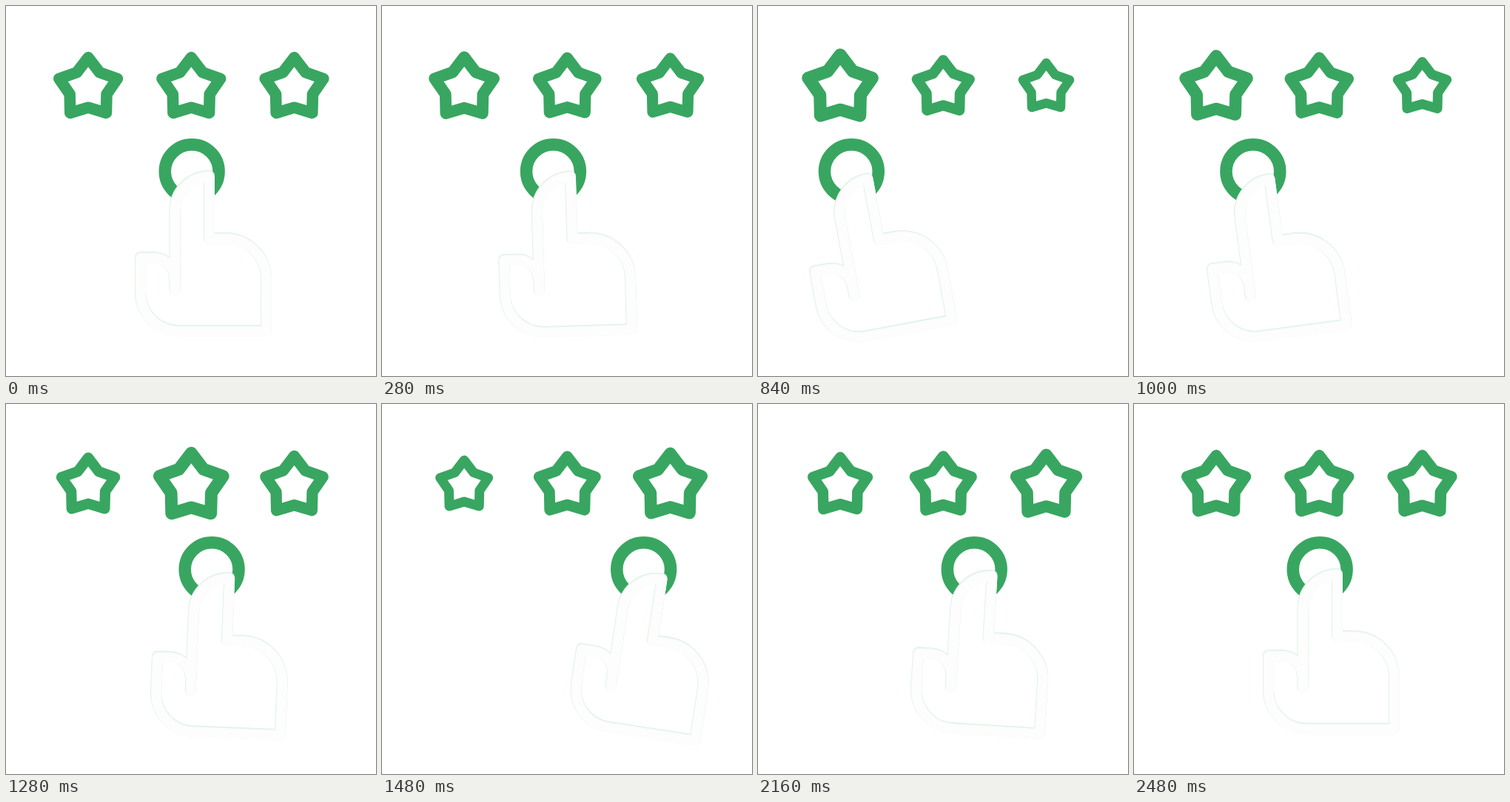
Animation, 500 px wide and 500 px high, one loop 3 s. Source, as an HTML page:

```html
<!DOCTYPE html>
<html lang="en">
<head>
<meta charset="utf-8">
<title>Rating stars</title>
<style>
  html, body { margin: 0; width: 100%; height: 100%; overflow: hidden; background: #fff; }
  svg { display: block; width: 100%; height: 100%; }
  .green { fill: none; stroke: #38a660; stroke-linejoin: round; }
  #stars { stroke-width: 15.5; }
  #ring { stroke-width: 16.5; }
  #hand { fill: none; stroke-linecap: round; stroke-linejoin: round; }
  #hand :first-child { fill: #fff; }
</style>
</head>
<body>
<svg viewBox="0 0 500 500">
  <defs>
    <path id="outline" d="M228 383v-107a46.5 46.5 0 0 1 46.5-46.5v84h22a55 55 0 0 1 55 55v70h-118a52 52 0 0 1-52-52v-47h18a28 28 0 0 1 28 28"/>
  </defs>
  <g id="stars" class="green"></g>
  <circle id="ring" class="green" cx="251.2" cy="223.6" r="36.4"/>
  <g id="hand"></g>
</svg>
<script>
const LOOP = 3000, STEP = 40;
const RING_REACH = 126.5, HAND_REACH = 127.7, TILT = 10.7, DROP = 5;
const PIVOT = "265.5 232";
const CENTER = 250.3, SPACING = 139.2, STAR_Y = 107;
const SHADES = 4;

const ring = document.getElementById("ring");
const hand = document.getElementById("hand");

function add(parent, name, attributes) {
  const node = document.createElementNS("http://www.w3.org/2000/svg", name);
  for (const key in attributes) node.setAttribute(key, attributes[key]);
  return parent.appendChild(node);
}

function starPoints() {
  return Array.from({ length: 10 }, (_, i) => {
    const radius = i % 2 ? 26.2 : 41.4, angle = i * Math.PI / 5;
    return [radius * Math.sin(angle), 4 - radius * Math.cos(angle)];
  }).join(" ");
}

const stars = [0, 1, 2].map(() =>
  add(document.getElementById("stars"), "polygon", { points: starPoints() }));

// Paler, thinner strokes slide downwards, leaving a green shade on upper edges.
for (let i = 0; i < SHADES; i++) {
  const k = i / (SHADES - 1);
  add(hand, "use", {
    href: "#outline",
    stroke: `hsl(140 ${45 - 25 * k}% ${89 + 10 * Math.sqrt(k)}%)`,
    "stroke-width": 15 - 2 * k,
    transform: `translate(${0.5 * k} ${1.4 * k})`
  });
}

function ease(time, from, to) {
  const p = Math.min(1, Math.max(0, (time - from) / (to - from)));
  return p * p * (3 - 2 * p);
}

// Size of a star that stands the given number of places from the finger.
const sizeAt = places => places ? 1 - 0.1 * places : 1.1;

function draw(time) {
  const left = ease(time, 160, 640);
  const across = ease(time, 800, 1640);
  const back = ease(time, 1640, 2480);
  const middle = ease(time, 800, 1220) - ease(time, 1220, 1640);
  const x = 2 * across - left - back;

  ring.setAttribute("transform", `translate(${x * RING_REACH} 0)`);
  hand.setAttribute("transform",
    `translate(${x * HAND_REACH} ${DROP * (left - back)}) rotate(${x * TILT} ${PIVOT})`);

  stars.forEach((star, i) => {
    const first = sizeAt(i), last = sizeAt(2 - i);
    const pass = i === 1 ? middle * (sizeAt(0) - sizeAt(1)) : 0;
    const size = 1 + left * (first - 1) + across * (last - first) + back * (1 - last) + pass;
    star.setAttribute("transform",
      `translate(${CENTER + (i - 1) * SPACING} ${STAR_Y}) scale(${size})`);
  });
}

const start = performance.now();
function tick() {
  const time = (performance.now() - start) % LOOP;
  draw(Math.floor(time / STEP) * STEP);
  requestAnimationFrame(tick);
}
tick();
</script>
</body>
</html>
```
